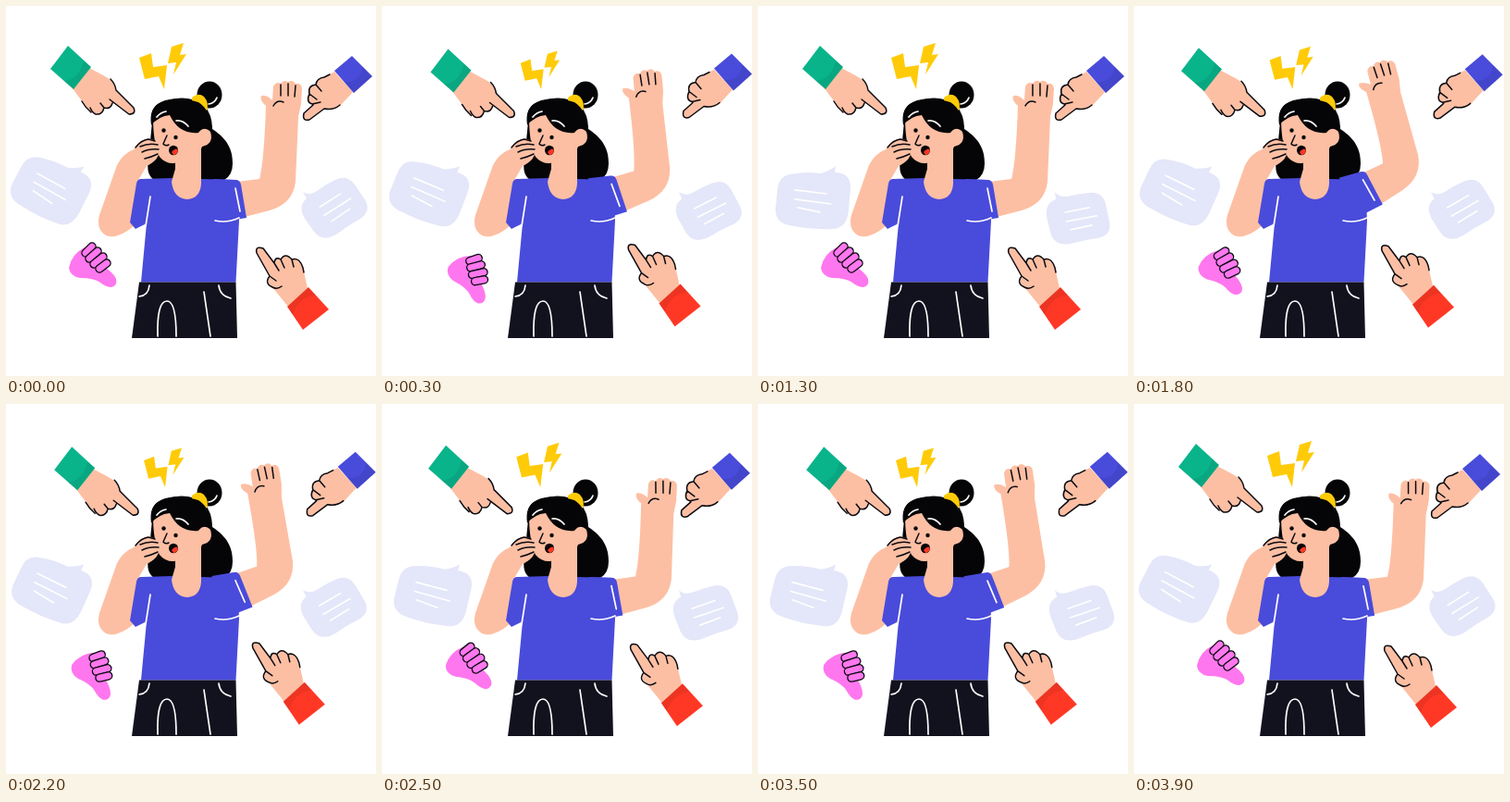
An HTML page that plays this animation: 400x400 px, repeating every 4000 ms.

```html
<!DOCTYPE html>
<html lang="en">
<head>
<meta charset="utf-8">
<title>Under pressure</title>
<style>
  html, body { margin: 0; width: 100%; height: 100%; overflow: hidden; background: #fff; }
  svg { display: block; width: 100vw; height: 100vh; }
  .skin { fill: #fdbfa3; }
  .blue { fill: #494bdb; }
  .black { fill: #050507; }
  .pale { fill: #e4e6f9; }
  .pink { fill: #ff77ee; }
  .shade { fill: #000; opacity: .07; }
  .ink, .chalk, .capsule { fill: none; stroke: #0b0b12; stroke-width: 1.5; stroke-linecap: round; stroke-linejoin: round; }
  .chalk { stroke: #fff; stroke-width: 1.7; }
  .capsule { stroke-width: 9.5; }
  .capsule.inner { stroke: #ff77ee; stroke-width: 6.8; }
</style>
</head>
<body>
<svg viewBox="0 0 400 400">
  <g id="bolts" fill="#ffcb08">
    <path d="M144 56 157 51 159 66 174 64 171 90 165 76 150 79Z"/>
    <path d="M179 44 192 40 188 53 195 52 181 74 184 61 175 62Z"/>
  </g>

  <g id="bubbleL">
    <path class="pale" d="M36 182 Q52 179 68 181 Q78 178 84 173 L83 180 Q101 180 100 198 L98 222 Q96 241 80 241 Q58 242 38 238 Q19 236 19 220 L21 200 Q22 184 36 182Z"/>
    <path class="chalk" d="M40 199 74 203M40 209 79 214M43 218 67 223"/>
  </g>
  <g id="bubbleR">
    <path class="pale" d="M321 201 Q325 207 334 206 Q346 203 358 202 Q373 201 376 215 L380 234 Q382 248 368 251 Q352 253 338 257 Q320 260 316 245 L312 228 Q310 213 322 209Z"/>
    <path class="chalk" d="M332 223 358 218M333 233 366 227M338 242 361 237"/>
  </g>

  <g id="handTL">
    <path class="skin" d="M90 67 L107 76 Q117 81 119 91 L138 110 Q141 117 133 117 L115 104 Q113 112 106 110 Q104 118 97 117 Q91 115 86 108 L71 88Z"/>
    <path fill="#0ab48b" d="M67 43 92 66 73 90 48 68Z"/>
    <path class="shade" d="M92 66 73 90 62 81 Q79 80 84 59Z"/>
    <path class="ink" d="M113 79 Q118 84 119 91 L138 110 Q141 117 133 117 L112 101M115 105 Q113 112 106 110 L102 105M106 110 Q104 118 97 117 Q93 115 91 110M82 103 Q86 110 92 115"/>
  </g>
  <g id="handTR">
    <path class="skin" d="M355 71 L344 77 Q336 78 335 85 Q326 86 328 95 Q322 101 332 107 L322 116 Q320 125 328 123 L344 111 Q354 114 362 107 L375 93Z"/>
    <path class="blue" d="M374 54 396 76 376 94 355 70Z"/>
    <path class="shade" d="M396 76 376 94 365 82 Q382 84 386 66Z"/>
    <path class="ink" d="M350 74 L344 77 Q336 78 335 85 L341 92M335 85 Q326 86 328 95 L336 101M328 95 Q324 104 331 106 L340 104M332 107 L322 116 Q320 125 328 123 L344 111 Q354 113 361 107"/>
  </g>
  <g id="handBR">
    <path class="skin" d="M326 305 L321 283 Q317 271 309 274 Q302 266 297 274 Q291 270 290 278 L278 262 Q269 259 271 267 L285 292 Q281 300 288 304 L305 325Z"/>
    <path fill="#ff3825" d="M327 304 349 328 321 350 304 325Z"/>
    <path class="shade" d="M327 304 304 325 310 334 Q317 314 335 313Z"/>
    <path class="ink" d="M322 288 L321 283 Q317 271 309 274 L311 282M309 274 Q302 266 297 274 L301 283M297 274 Q291 270 290 278 L278 262 Q269 259 271 267 L285 292 Q279 300 288 304 Q293 307 298 303M285 292 L292 297M290 278 L295 286"/>
  </g>

  <g id="thumb">
    <path class="pink" d="M85 261 Q71 268 68 283 Q69 292 80 294 Q95 294 102 299 Q108 304 114 304 Q121 302 119 295 Q116 288 106 282Z"/>
    <g id="knuckles"></g>
  </g>

  <path class="black" d="M158 125 Q154 108 172 102 Q198 95 214 107 Q223 117 223 133 C240 144 245 156 245 170 Q245 183 236 188 L160 188 Q151 182 154 166Z"/>
  <ellipse class="black" cx="220" cy="96" rx="13.5" ry="14.5"/>
  <path class="chalk" d="M219 106 Q226 105 228 99"/>
  <path fill="#ffcb08" d="M201 99 Q208 93 214 98 Q220 105 217 113 Q211 114 209 108 Q206 103 201 103Z"/>

  <path class="skin" d="M152 143 Q164 144 166 154 Q166 166 152 173 L142 190 L138 238 Q120 253 108 248 Q97 241 101 226 L120 172 Q126 160 138 155Z"/>
  <path class="blue" d="M146 187 L180 186 L211 187 L250 188 L252 232 L248.5 298.5 L146 298.5 L152 235 L140 241 L134 234 L141 192 Q142 187 146 187Z"/>
  <path class="chalk" d="M156 206 L151 238"/>
  <path class="skin" d="M183 160 L211 148 L211 192 Q210 208 196 209 Q181 208 179 190 L183 176Z"/>

  <path class="skin" d="M159 125 Q165 114 176 113 L207 134 Q216 130 221 136 Q225 149 212 152 Q207 166 191 168 Q175 174 166 163 Q160 152 159 125Z"/>
  <path class="black" d="M157 129 Q154 110 168 104 Q186 97 208 104 Q221 112 223 134 Q213 130 208 137 Q187 139 177 118 Q165 119 157 129Z"/>
  <path class="chalk" d="M163 120 Q167 115 173 114M184 124 Q191 123 197 130"/>
  <path class="ink" d="M174 140 L170 149 Q172 152 176 150"/>
  <circle class="black" cx="170.5" cy="134.5" r="2.2"/>
  <circle class="black" cx="183.5" cy="142" r="2.2"/>
  <ellipse class="black" cx="181" cy="156" rx="5" ry="5.3"/>
  <path fill="#ff3825" d="M179 158 Q184 152 186 156 Q185 161 181 161Z"/>

  <path class="skin" d="M139 155 Q145 143 154 144 L161 146 Q166 149 166 156 Q165 167 153 172Z"/>
  <path class="ink" d="M140 153 Q146 145 154 144 L161 146M145 152 Q154 148 164 150M147 158 Q155 154 165 155M150 165 Q158 163 164 160"/>

  <path fill="#12121f" d="M144 298.5 L248.5 298.5 L250 359 L136 359Z"/>
  <path class="chalk" d="M164 357 Q163 319 174 319 Q184 319 184 357M214 309 L221 357M144 314 Q154 313 155 302M230 302 Q231 313 243 316"/>

  <g id="arm">
    <path class="skin" d="M250 190 L274 187 Q279 168 281 108 Q274 102 276 97 Q282 96 288 102 L289 87 Q292 81 297 84 Q300 79 305 82 Q310 79 313 84 Q319 83 320 89 L319 106 L316 120 L313 190 Q310 214 285 221 L258 228Z"/>
    <path class="ink" d="M297 85 L297 97M305 84 L305 97M313 86 L312 98M289 108 Q293 101 300 104"/>
    <path class="blue" d="M224 187 L248 188 Q253 188 254 193 L260 229 L228 234Z"/>
    <path class="chalk" d="M248 197 L253 222"/>
  </g>
  <path class="chalk" d="M226 232 Q239 235 252 229"/>
</svg>
<script>
const LOOP = 4000, STEP = 100;
const $ = id => document.getElementById(id);
const place = (id, transform) => $(id).setAttribute('transform', transform);
const swing = (t, period) => (1 - Math.cos(2 * Math.PI * t / period)) / 2;

// Curled fingers: outlined capsules, each overlapping the one before.
const fingers = ['M86 267 93 260', 'M90 273 99 265', 'M95 279 105 271', 'M101 284 109 278'];
$('knuckles').innerHTML = fingers.map(d =>
  `<path class="capsule" d="${d}"/><path class="capsule inner" d="${d}"/>`).join('');

function draw(t) {
  const poke = Math.abs(Math.sin(Math.PI * t / 650));
  const pulse = poke * poke;
  const tilt = 22 - 27.5 * swing(t, 2000);
  const size = 1 - 0.17 * pulse;

  place('handTL', `translate(${4.5 * poke} ${3.5 * poke})`);
  place('handTR', `translate(${4 * poke} ${-2.5 * poke})`);
  place('handBR', `translate(${-4.5 * poke} ${-3.5 * poke})`);
  place('thumb', `rotate(${27 * pulse} 72 290)`);
  place('bolts', `translate(178 90) scale(${size}) translate(-178 -90)`);
  place('bubbleL', `rotate(${tilt} 83 174)`);
  place('bubbleR', `rotate(${-tilt} 321 201)`);
  place('arm', `rotate(${-20 * swing(t, 1285)} 219 194)`);
}

function tick() {
  const t = performance.now() % LOOP;
  draw(Math.floor(t / STEP) * STEP);
  requestAnimationFrame(tick);
}
tick();
</script>
</body>
</html>
```
